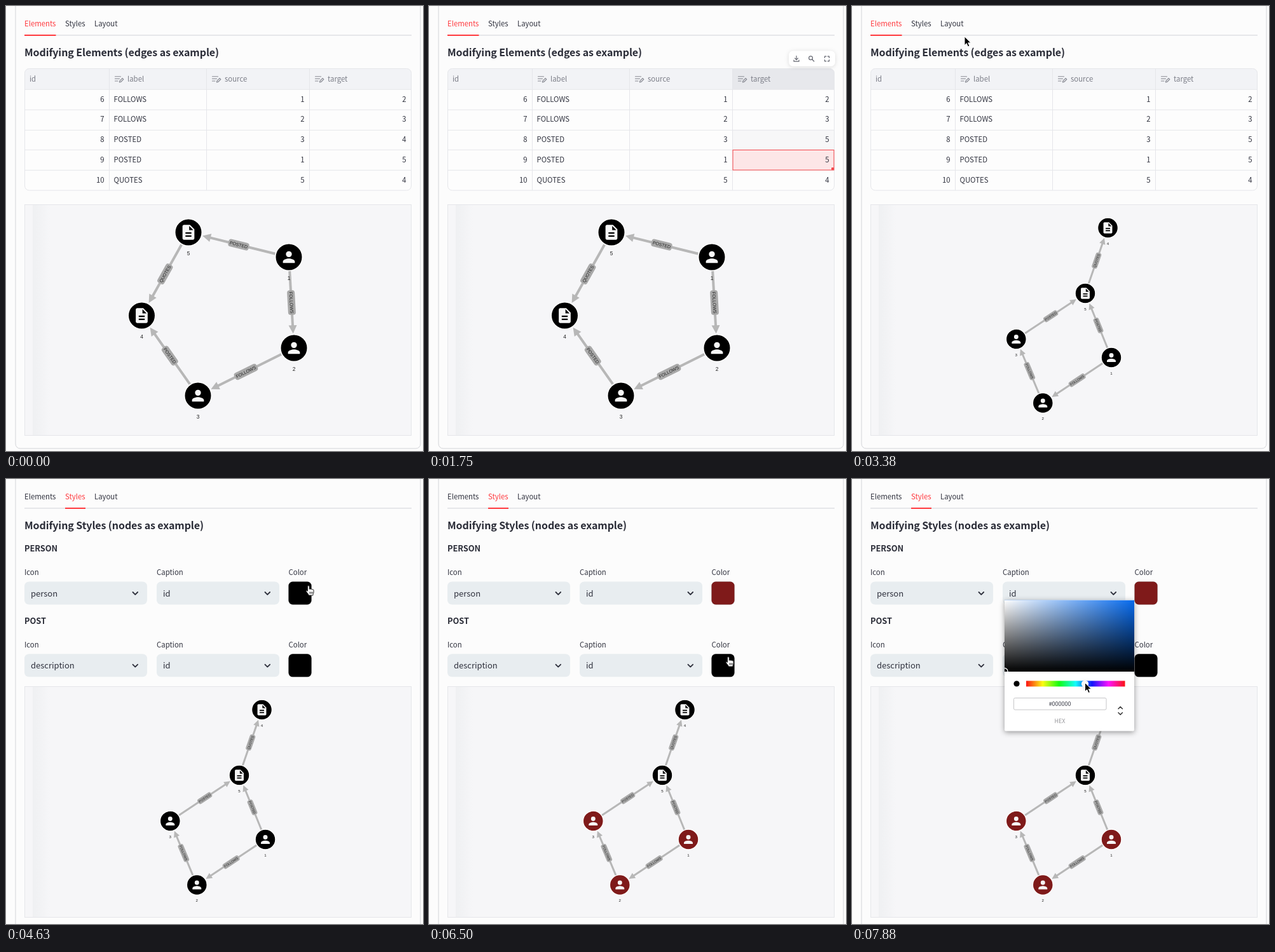
Write an HTML page that moves like this. It is 656 by 700 pixels and loops after 8000 ms.

```html
<!DOCTYPE html>
<html lang="en">
<head>
<meta charset="utf-8">
<title>Graph editor</title>
<style>
  html, body { margin: 0; width: 100%; height: 100%; overflow: hidden; background: #fcfcfc; }
  svg { display: block; }
  text { font: 11.37px "Noto Sans CJK SC", "Noto Sans CJK JP", "Noto Sans CJK", sans-serif; fill: #31333f; }
  .title { font-size: 16px; font-weight: 700; letter-spacing: -.1px; fill: #2b2d38; }
  .sub { font-size: 12.8px; font-weight: 700; letter-spacing: -.05px; fill: #2b2d38; }
  .head { fill: #7c7e88; }
  .num { text-anchor: end; }
  .value { font-size: 13px; }
  .hex { font-size: 8.95px; text-anchor: middle; }
  .graph text { font: 8.3px "Liberation Sans", Arial, sans-serif; text-anchor: middle; fill: #222; }
  .graph .tag { font-size: 7px; }
  .line { fill: none; stroke: #e5e6ea; }
  .stroke { fill: none; stroke-linecap: round; stroke-linejoin: round; }
  .pop { filter: drop-shadow(0 2px 4px rgba(0, 0, 0, .4)); }
  .bar { filter: drop-shadow(0 1px 3px rgba(0, 0, 0, .13)); }
</style>
</head>
<body>
<svg id="stage" width="656" height="700" viewBox="0 0 656 700">
  <defs>
    <linearGradient id="white"><stop stop-color="#fff"/><stop offset="1" stop-color="#fff" stop-opacity="0"/></linearGradient>
    <linearGradient id="black" x2="0" y2="1"><stop stop-opacity="0"/><stop offset="1"/></linearGradient>
    <linearGradient id="strip"><stop stop-color="#eff0f2"/><stop offset="1" stop-color="#f6f6f8"/></linearGradient>
    <linearGradient id="rainbow"></linearGradient>
    <path id="person" d="M12 4a4 4 0 1 1 0 8a4 4 0 1 1 0-8zM12 14c-2.67 0-8 1.34-8 4v2h16v-2c0-2.66-5.33-4-8-4z"/>
    <path id="doc" d="M14 2H6c-1.1 0-2 .9-2 2v16c0 1.1.9 2 2 2h12c1.1 0 2-.9 2-2V8zm2 16H8v-2h8zm0-4H8v-2h8zm-3-5V3.5L18.5 9z"/>
    <g id="edit" class="stroke" stroke="#858790" stroke-width="1.2">
      <path d="M0 1h9M0 4.5h7M0 8h4.500M7 10l.4-2.200 4.200-4.200 1.700 1.700-4.200 4.200z"/>
    </g>
  </defs>

  <rect id="frame" class="line" x="15" y="-20" width="637" rx="7" style="stroke:#d3d4d8"/>
  <path d="M29 46H638" stroke="#e6e7ea" stroke-width="2"/>
  <rect id="mark" y="45" height="2" fill="#ff3a3f"/>
  <text id="tab0" x="29" y="32">Elements</text>
  <text id="tab1" x="93" y="32">Styles</text>
  <text x="139" y="32">Layout</text>

  <g id="elements">
    <text class="title" x="29" y="79">Modifying Elements (edges as example)</text>
    <g id="table"></g>
    <g id="tools">
      <rect class="bar" x="566" y="70.500" width="73" height="24.500" rx="7" fill="#fff"/>
      <g class="stroke" stroke="#666872" stroke-width="1.200">
        <path d="M578 78.500v6M575.500 82.200l2.500 2.500 2.500-2.500M574 85v2.200h8V85"/>
        <circle cx="600.500" cy="81.800" r="2.900"/><path d="M602.700 84l3 3"/>
        <path d="M622.500 81.500v-2.300h2.300M627.200 79.200h2.300v2.300M629.500 84.500v2.300h-2.300M624.800 86.800h-2.300v-2.300"/>
      </g>
    </g>
  </g>

  <g id="styles">
    <text class="title" x="29" y="79">Modifying Styles (nodes as example)</text>
  </g>

  <g id="graph" class="graph">
    <rect x="29.500" y="312.500" width="608" height="363" fill="#f6f6f8" stroke="#e5e6ea"/>
    <rect x="42" y="313" width="27" height="362" fill="url(#strip)"/>
  </g>

  <g id="picker">
    <rect class="pop" width="204" height="206" rx="2" fill="#fff"/>
    <svg width="204" height="112.500">
      <rect id="hue" width="204" height="113"/>
      <rect width="204" height="113" fill="url(#white)"/>
      <rect width="204" height="113" fill="url(#black)"/>
      <circle id="spot" r="5" fill="none" stroke="#fff" stroke-width="1.300"/>
    </svg>
    <circle id="dot" cx="19" cy="131.500" r="4.600"/>
    <rect x="34" y="127" width="155.500" height="9" fill="url(#rainbow)"/>
    <circle id="knob" class="bar" cy="131.800" r="5.600" fill="#f8f8f8"/>
    <rect x="14.500" y="154" width="145.500" height="18.500" rx="2" fill="#fff" stroke="#c6c6c8"/>
    <text id="hex" class="hex" x="87" y="166.700"></text>
    <text class="hex" x="87" y="193" style="fill:#96969a">HEX</text>
    <path class="stroke" stroke="#333" stroke-width="1.500" d="M179 171l3.200-3.200 3.200 3.200M179 177l3.200 3.200 3.200-3.200"/>
  </g>

  <g id="cursor">
    <path id="arrow" d="M0 0V13.800L3.200 10.800 5.400 16 7.900 15 5.700 9.900H10Z" stroke="#fff"/>
    <path id="hand" d="M-1.500 1C-1.500-.7 1.200-.7 1.200 1V5.500C1.200 4.500 3.500 4.500 3.500 5.700 3.500 4.800 5.800 4.900 5.800 6.200 6 5.400 8 5.600 8 7V10C8 12 7 12.500 6.800 15H.3C0 13-2.700 11-3.700 8.800-4.300 7.400-2.700 6.800-1.500 8.500ZM2 9.500v3M4 9.500v3M6 9.500v3" fill="#fff" stroke="#222"/>
  </g>
</svg>

<script>
const LOOP = 8000;
const $ = id => document.getElementById(id);
const add = (id, html) => $(id).insertAdjacentHTML('beforeend', html);
const set = (el, attrs) => { for (const k in attrs) el.setAttribute(k, attrs[k]); };
const show = (el, on) => { el.style.display = on ? '' : 'none'; };
const mix = (a, b, u) => a + (b - a) * u;
const clamp = u => Math.max(0, Math.min(1, u));
const within = (t, a, b) => t >= a && t < b;

// Moments of the story, in ms
const T = { select: 500, edit: 1000, type: 1250, enter: 1500, rerun: 2130, move: 2300, settled: 3050,
  styles: 3750, openA: 4880, pick: 5250, closeA: 6000, recolor: 6130, openB: 6750, hue: 7500 };

// Cursor path: time, x, y
const path = [
  [130, 634, 165], [450, 590, 216], [2130, 560, 296], [2700, 380, 200], [3380, 177, 48],
  [3500, 177, 48], [3700, 112, 29], [3900, 112, 29], [4600, 476, 168], [4900, 476, 168],
  [5250, 508, 266], [5560, 523.5, 252.6], [5750, 523.5, 252.6], [5950, 608, 262],
  [6050, 608, 262], [6480, 471, 280], [6800, 471, 280], [7300, 442, 321], [7480, 412, 321],
  [7820, 366.5, 320.5]
];

// Table
const colX = [29.5, 162.5, 315.5, 477.5, 637.5];
const rowY = i => 131 + i * 31.8;
const rows = [[6, 'FOLLOWS', 1, 2], [7, 'FOLLOWS', 2, 3], [8, 'POSTED', 3, 4], [9, 'POSTED', 1, 5], [10, 'QUOTES', 5, 4]];
add('table', `
  <rect x="29.500" y="98.500" width="608" height="191.500" rx="7" fill="#fdfdfd"/>
  <path d="M29.500 131V105.500a7 7 0 0 1 7-7H630.500a7 7 0 0 1 7 7V131z" fill="#f2f3f6"/>
  <path id="headOn" d="M477.500 131V98.500H630.500a7 7 0 0 1 7 7V131z" fill="#e7e8ec"/>
  <rect id="hover" x="478" y="194.600" width="159" height="31.800" fill="#f7f7f8"/>
  <path class="line" d="${rows.map((r, i) => `M29.500 ${Math.round(rowY(i)) + .3}H637.500`).join('')}${colX.slice(1, 4).map(x => `M${x} 98.500V290`).join('')}"/>
  <rect class="line" x="29.500" y="98.500" width="608" height="191.500" rx="7"/>`);
['id', 'label', 'source', 'target'].forEach((name, i) => {
  add('table', `<text class="head" x="${colX[i] + (i ? 28.5 : 7.5)}" y="119">${name}</text>` +
    (i ? `<use href="#edit" x="${colX[i] + 9}" y="110"/>` : ''));
});
add('table', `<g id="pickCell"><rect x="478" y=".5" width="159" height="31.500" fill="#fde6e7" stroke="#f5484d"/>
  <rect x="633" y="28" width="4" height="4" rx="1" fill="#f5484d"/></g>`);
rows.forEach((row, r) => row.forEach((v, c) => {
  const x = c === 1 ? 169.5 : colX[c + 1] - 8;
  add('table', `<text id="cell${r}${c}" class="${c === 1 ? '' : 'num'}" x="${x}" y="${rowY(r) + 19.6}">${v}</text>`);
}));

// Style controls
const field = (x, y, label, value) => `<text x="${x}" y="${y}">${label}</text>
  <rect x="${x}" y="${y + 10.5}" width="193" height="36" rx="7" fill="#e8edf0"/>
  <text class="value" x="${x + 10}" y="${y + 33.5}">${value}</text>
  <path class="stroke" stroke="#31333f" stroke-width="1.900" d="M${x + 170.500} ${y + 27}l3.800 3.800 3.800-3.800"/>`;
[['PERSON', 'person', 151], ['POST', 'description', 264.800]].forEach(([name, icon, y], i) => add('styles', `
  <text class="sub" x="29" y="${y - 37}">${name}</text>
  ${field(29, y, 'Icon', icon)}${field(237, y, 'Caption', 'id')}
  <text x="444.500" y="${y}">Color</text>
  <rect id="swatch${i}" x="444.500" y="${y + 10.500}" width="36" height="36" rx="6.500" stroke="#00000022"/>`));

// Graph
const R = 21.3, ZOOM = .744;
const nodes = {
  1: [445, 395, 408, 553], 2: [453, 538, 300.3, 624.5], 3: [302, 613, 258.3, 524],
  4: [213.5, 487, 402.5, 349], 5: [287, 356, 367, 452]
};
const tagWidth = { FOLLOWS: 39, POSTED: 33, QUOTES: 34 };
rows.forEach(([id, name], i) => {
  const w = tagWidth[name];
  add('graph', `<g id="edge${i}"><path class="shaft" stroke="#b7b7b7" stroke-width="4"/>
    <path class="tip" d="M0 0L-13-6.500V6.500z" fill="#b7b7b7"/>
    <g class="label"><rect x="${-w / 2}" y="-6" width="${w}" height="12" rx="4" fill="#a9a9a9"/>
    <text class="tag" y="2.500">${name}</text></g></g>`);
});
for (const id in nodes) {
  add('graph', `<g id="node${id}"><circle r="${R}" stroke="#fff" stroke-width="1.600"/>
    <use href="#${id < 4 ? 'person' : 'doc'}" transform="scale(1.170) translate(-12 -12)" fill="#f6f6f6"/>
    <text y="36">${id}</text></g>`);
}

for (let h = 0; h <= 360; h += 60) add('rainbow', '');
$('rainbow').innerHTML = '';
for (let h = 0; h <= 360; h += 60) {
  const stop = document.createElementNS('http://www.w3.org/2000/svg', 'stop');
  set(stop, { offset: h / 360, 'stop-color': `hsl(${h}, 97%, 53%)` });
  $('rainbow').append(stop);
}

function cursorAt(t) {
  let i = path.findIndex(p => p[0] > t);
  if (i < 0) i = path.length;
  const a = path[Math.max(0, i - 1)], b = path[Math.min(path.length - 1, i)];
  const u = b[0] > a[0] ? clamp((t - a[0]) / (b[0] - a[0])) : 0;
  const s = u * u * (3 - 2 * u);
  return [mix(a[1], b[1], s), mix(a[2], b[2], s)];
}

function drawGraph(t, color) {
  const u = clamp((t - T.move) / (T.settled - T.move));
  const k = mix(1, ZOOM, u);
  const at = id => { const [a, b, c, d] = nodes[id]; return [mix(a, c, u), mix(b, d, u)]; };
  for (const id in nodes) {
    const [x, y] = at(id), el = $('node' + id);
    set(el, { transform: `translate(${x} ${y}) scale(${k})` });
    el.firstChild.setAttribute('fill', id < 4 && t >= T.recolor ? color : '#000');
  }
  rows.forEach(([id, , from, to], i) => {
    const [x1, y1] = at(from), [x2, y2] = at(id === 8 && t >= T.rerun ? 5 : to);
    const len = Math.hypot(x2 - x1, y2 - y1) / k;
    const deg = Math.atan2(y2 - y1, x2 - x1) * 180 / Math.PI;
    const el = $('edge' + i), end = len - R - 1.5;
    set(el, { transform: `translate(${x1} ${y1}) rotate(${deg}) scale(${k})` });
    set(el.querySelector('.shaft'), { d: `M${R + .8} 0H${end - 11}` });
    set(el.querySelector('.tip'), { transform: `translate(${end} 0)` });
    set(el.querySelector('.label'), { transform: `translate(${len / 2} 0) rotate(${Math.abs(deg) > 90 ? 180 : 0})` });
  });
  set($('graph'), { transform: `translate(0 ${t >= T.styles ? 14 : 0})` });
}

function drawTable(t) {
  const on = within(t, T.select, T.rerun);
  $('cell23').textContent = t >= T.type ? 5 : 4;
  show($('headOn'), on);
  show($('tools'), within(t, 380, T.rerun));
  show($('pickCell'), on);
  show($('hover'), within(t, T.enter, T.rerun));
  const editing = within(t, T.edit, T.enter);
  set($('pickCell'), { transform: `translate(0 ${rowY(t < T.enter ? 2 : 3) - .4})` });
  set($('pickCell').firstChild, { fill: editing ? '#fff' : '#fde6e7' });
}

// Returns the person colour as shown on screen
function drawPicker(t, x, y) {
  const first = within(t, T.openA, T.closeA), second = t >= T.openB;
  let s = 0, v = 0, hue = 0;
  if (t >= T.pick) {
    const [px, py] = first ? [x, y] : [523.5, 252.6];
    s = clamp((px - 361) / 204);
    v = clamp(1 - (py - 204) / 112);
  }
  const rgb = [v, v * (1 - s), v * (1 - s)].map(c => Math.round(c * 255));
  const color = `rgb(${rgb.map(c => Math.round(c * .88))})`;
  if (second) {
    s = v = 0;
    if (t >= T.hue) hue = clamp((x - 274) / 155.5) * 360;
  }
  show($('picker'), first || second);
  set($('picker'), { transform: second ? 'translate(240 190.500)' : 'translate(361 204)' });
  set($('hue'), { fill: `hsl(${hue}, 94%, ${mix(57, 48, clamp((360 - hue) % 360 / 147))}%)` });
  set($('spot'), { cx: s * 204, cy: (1 - v) * 112 });
  set($('knob'), { cx: 34 + hue / 360 * 155.5 });
  set($('dot'), { fill: second ? '#000' : color });
  $('hex').textContent = '#' + (second ? [0, 0, 0] : rgb).map(c => c.toString(16).padStart(2, '0')).join('').toUpperCase();
  set($('swatch0'), { fill: color });
  return color;
}

function draw(t) {
  const styles = t >= T.styles;
  const [x, y] = cursorAt(t);
  show($('elements'), !styles);
  show($('styles'), styles);
  set($('frame'), { height: styles ? 800 : 716 });
  const u = clamp((t - T.styles) / 200);
  set($('mark'), { x: mix(29, 93, u), width: mix(49.5, 32, u) });
  $('tab0').style.fill = styles ? '' : '#ff3a3f';
  $('tab1').style.fill = styles ? '#ff3a3f' : '';

  if (!styles) drawTable(t);
  drawGraph(t, drawPicker(t, x, y));

  const hand = within(t, 3620, 4000) || within(t, 4550, 4960) || within(t, 6440, 6860);
  show($('cursor'), within(t, 130, T.edit) || t >= T.rerun);
  show($('hand'), hand);
  show($('arrow'), !hand);
  set($('cursor'), { transform: `translate(${x} ${y})` });
}

function tick() {
  draw(performance.now() % LOOP);
  requestAnimationFrame(tick);
}
tick();
</script>
</body>
</html>
```
